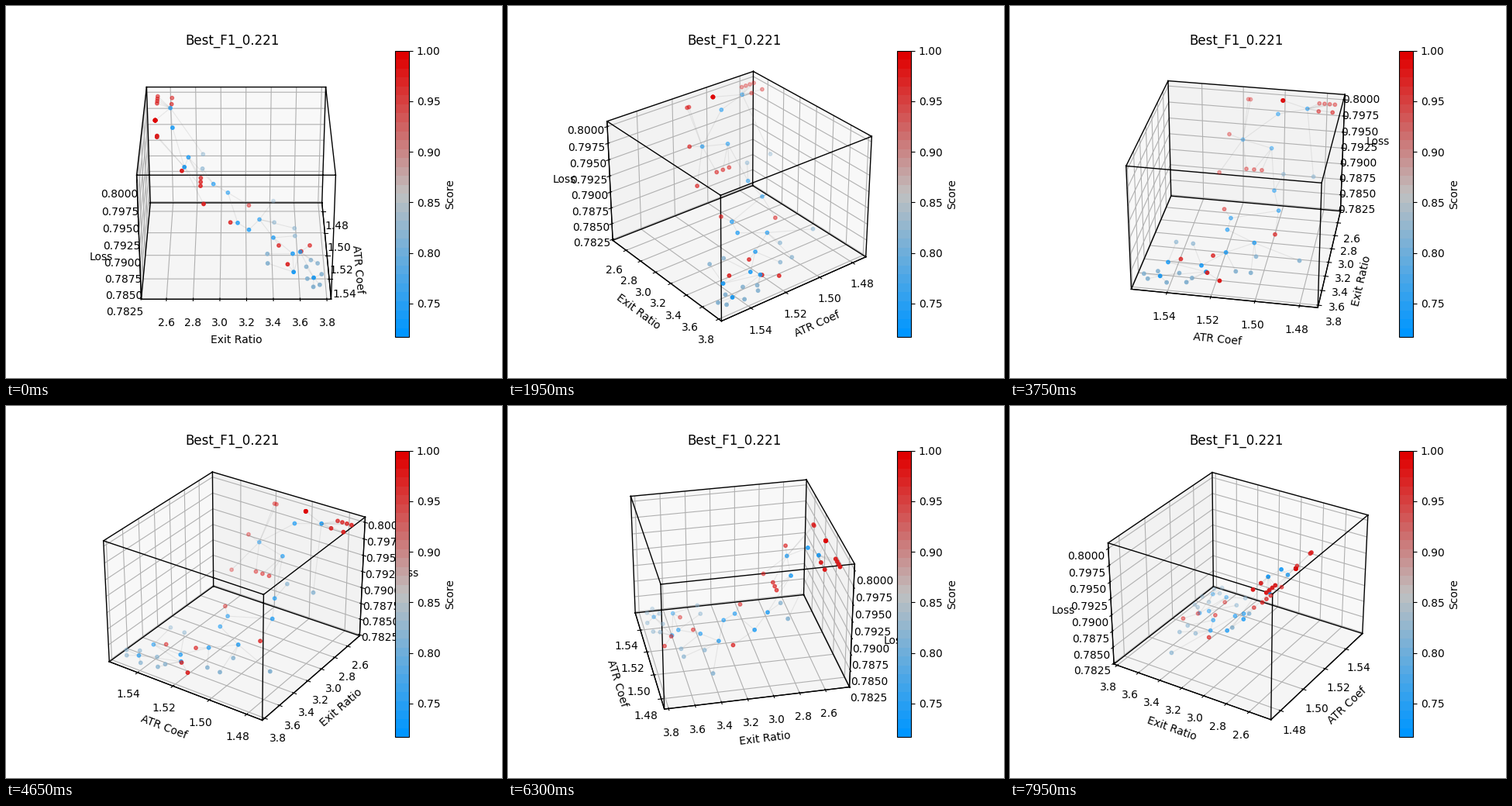
A matplotlib script that plays this animation: 640 by 480 pixels, repeating every 8000 ms.

```python
import itertools

import matplotlib.pyplot as plt
import numpy as np
from matplotlib.animation import FuncAnimation
from matplotlib.colors import LinearSegmentedColormap
from mpl_toolkits.mplot3d.art3d import Line3DCollection

TICK_MS, LOOP_MS = 50, 8000
TICKS_PER_TURN, TURN_DEG = 3, 4
LIMITS = np.array([(1.4718, 1.5564), (2.4115, 3.8320), (0.78233, 0.80079)])
BOX = np.array([1.1905, 1.1905, 0.8929])
BLUE, GREY, RED = 0.73, 0.82, 0.98

# (ATR, exit) positions are measured from the middle of the box.
BEST = (-0.195, -0.521)
HUBS = [BEST, (-0.37, -0.43), (-0.18, -0.41), (0.04, -0.33), (-0.155, -0.31),
        (-0.20, -0.15), (-0.245, -0.055), (0.06, 0.01), (0.07, 0.083),
        (-0.12, 0.154), (0.05, 0.243), (0.187, 0.366), (0.405, 0.365),
        (0.147, 0.416), (0.43, 0.492)]
REDS = [(0.133, -0.343), (0.176, -0.207), (0.112, -0.037), (-0.244, 0.085),
        (0.128, 0.277), (0.329, 0.329), (0.138, 0.423), (0.047, 0.483)]


def fan(exit_ratio, first, last, count):
    return [(atr, exit_ratio) for atr in np.linspace(first, last, count)]


def ring(center, radii, count, start):
    angles = np.radians(start) + np.arange(count) * 2 * np.pi / count
    return [(center[0] + radii[0] * np.cos(a), center[1] + radii[1] * np.sin(a))
            for a in angles]


def loss(exit_ratio):
    """Loss decays with the exit ratio, below a flat ceiling."""
    return np.minimum(0.405, 0.25 * np.exp(-2.88 * exit_ratio) - 0.455)


def to_data(flat):
    flat = np.array(flat)
    box = np.column_stack([flat, loss(flat[:, 1])])
    return LIMITS.mean(axis=1) + box * np.ptp(LIMITS, axis=1) / BOX


def nearest_hub(point):
    return min(HUBS, key=lambda hub: np.hypot(*np.subtract(hub, point)))


def cube_path():
    """All twelve box edges as one path, separated by NaN."""
    path = []
    for a, b in itertools.combinations(itertools.product((0, 1), repeat=3), 2):
        if np.abs(np.subtract(a, b)).sum() == 1:
            path += [LIMITS[range(3), a], LIMITS[range(3), b], [np.nan] * 3]
    return np.array(path).T


reds = (REDS + fan(-0.52, -0.54, -0.437, 4) + fan(-0.425, -0.536, -0.445, 2)
        + fan(-0.50, 0.018, 0.033, 2) + fan(-0.23, -0.104, -0.001, 3))
greys = (fan(-0.222, -0.447, -0.249, 2) + fan(0.253, -0.429, -0.148, 2)
         + fan(0.20, 0.274, 0.386, 2) + fan(0.388, -0.137, -0.04, 2)
         + ring((0.38, 0.495), (0.16, 0.05), 7, 40))
trials = [(BEST, 1.0)] * 6
for group, score in ((HUBS[1:], BLUE), (reds, RED), (greys, GREY)):
    trials += [(point, score) for point in group]
places, scores = zip(*trials)
links = list(zip(HUBS, HUBS[1:])) + [(nearest_hub(p), p) for p in reds + greys]

fig = plt.figure(figsize=(6.4, 4.8), dpi=100)
ax = fig.add_subplot(projection="3d")
cmap = LinearSegmentedColormap.from_list(
    "score", ["#0096ff", "#c0c0c0", "#e00000"], N=32)
dots = ax.scatter(*to_data(places).T, c=scores, s=10,
                  cmap=cmap, vmin=0.7167, vmax=1.0)
ax.add_collection3d(Line3DCollection(
    [to_data(link) for link in links], colors="gray", alpha=0.15, linewidths=0.8))
ax.plot(*cube_path(), color="black", linewidth=1)

ax.set(xlim=LIMITS[0], ylim=LIMITS[1], zlim=LIMITS[2],
       xlabel="ATR Coef", ylabel="Exit Ratio", zlabel="Loss",
       title="Best_F1_0.221")
fig.colorbar(dots, ax=ax, label="Score")


def update(tick):
    ax.view_init(elev=30, azim=TURN_DEG * (tick // TICKS_PER_TURN))
    return ()


anim = FuncAnimation(fig, update, frames=LOOP_MS // TICK_MS,
                     interval=TICK_MS, repeat=True, repeat_delay=0)
plt.show()
```
